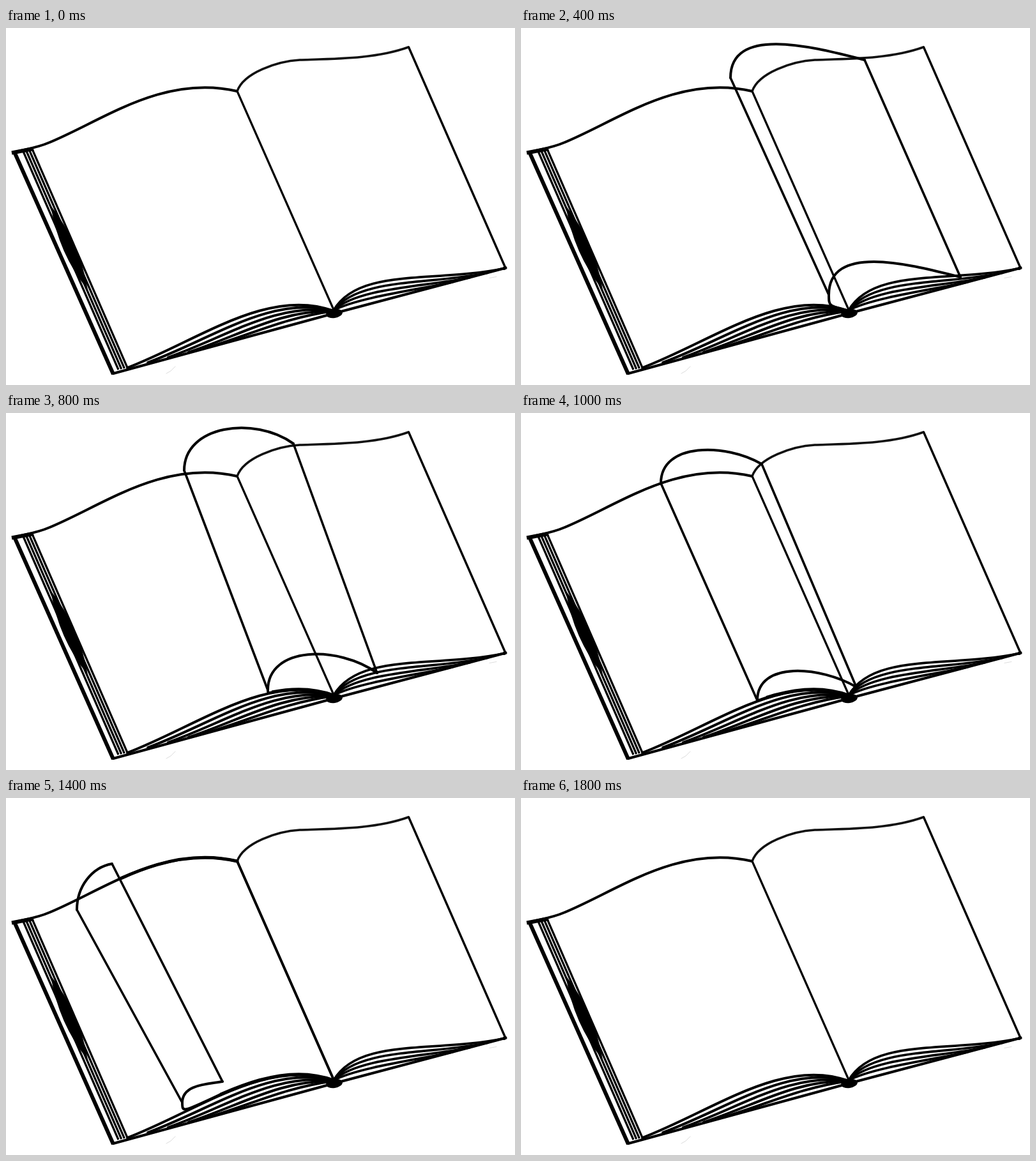
Write an HTML page with a canvas that moves like this. It is 797x559 px and loops after 1.9 s.

```html
<!DOCTYPE html>
<html lang="en">
<head>
<meta charset="utf-8">
<title>Turning page</title>
<style>
html, body { margin: 0; width: 100%; height: 100%; overflow: hidden; background: #fff; }
canvas { display: block; }
</style>
</head>
<body>
<canvas id="stage" width="797" height="559"></canvas>
<script>
const W = 797, H = 559, STEP = 100, LOOP = 1900;
const ctx = document.getElementById('stage').getContext('2d');
const points = s => s.split(' ').map(p => p.split(',').map(Number));

// Paths of the sheet's corners: the fold and the free edge, top and bottom
const keyTimes = [0, 400, 800, 1000, 1200, 1400, 1700];
const foldTop = points('362,98 328,78 279,90 219,110 148,122 111,175 62,176');
const foldBottom = points('513,440 482,418 410,434 370,450 313,449 276,477 220,508');
const freeTop = points('630,30 538,50 450,48 377,80 274,60 166,103 30,166');
const freeBottom = points('782,375 688,390 581,407 525,429 426,406 339,444 177,508');

const leftTop = new Path2D('M11 195C30 190 50 187 66 180C150 146 245 72 362 99');
const rightTop = new Path2D('M362 99C372 70 425 52 460 50C520 48 580 48 630 30');
const spine = [[362, 99], [513, 441]];

// Lower edges of the two covers
const leftEdge = x => 541 - (x - 168) * 0.2725;
const rightEdge = x => 447 - (x - 513) * 0.264;

function stroke(path, width, color = '#000') {
  ctx.lineWidth = width;
  ctx.strokeStyle = color;
  ctx.stroke(path);
}

function line(a, b, width, color) {
  const path = new Path2D();
  path.moveTo(...a);
  path.lineTo(...b);
  stroke(path, width, color);
}

function cubic([a, b, c, d], width, color) {
  const path = new Path2D();
  path.moveTo(...a);
  path.bezierCurveTo(...b, ...c, ...d);
  stroke(path, width, color);
}

function rightOf(x, paint) {
  ctx.save();
  ctx.beginPath();
  ctx.rect(x, 0, W, H);
  ctx.clip();
  paint();
  ctx.restore();
}

// Leaf seen from below; f runs from the top page (0) down to the cover (1)
function leftLeaf(f) {
  const x = 190 + 160 * f, x1 = x + 110 - 44 * f, x2 = 410 + 30 * f;
  return [
    [x, leftEdge(x) - 3 * (1 - f)], [x1, leftEdge(x1) - 15 * (1 - f)],
    [x2, leftEdge(x2) - 70 * (1 - f)], [513, 443]
  ];
}

function rightLeaf(f) {
  const x1 = 552, x2 = 670 - 20 * f, x = 782 - 110 * f;
  return [
    [513, 442], [x1, rightEdge(x1) - 62 * (1 - f)],
    [x2, rightEdge(x2) - 6 * (1 - f)], [x, rightEdge(x)]
  ];
}

// Point of the left top page; x is very nearly linear along the curve
function onLeftPage(x) {
  const u = (x - 190) / 323, v = 1 - u;
  const weights = [v * v * v, 3 * v * v * u, 3 * v * u * u, u * u * u];
  return [x, leftLeaf(0).reduce((y, p, i) => y + p[1] * weights[i], 0)];
}

function drawBook() {
  ctx.lineCap = 'butt';
  line([13, 194], [168, 542], 6);
  line([9, 195.5], [43, 189], 6);
  for (let i = 0; i < 4; i++) line([26 + i * 5.2, 191], [176 + i * 4.7, 535 - i], 3.2);
  ctx.fillStyle = '#000';
  ctx.fill(new Path2D('M70 278Q82 353 128 410Q116 337 70 278'));

  ctx.lineCap = 'round';
  stroke(leftTop, 4);
  stroke(rightTop, 3.6, '#111');
  line([630.5, 30], [782, 375.5], 3.4);
  line(...spine, 3.2);
  for (let i = 0; i < 5; i++) cubic(leftLeaf(i / 5), 4);
  for (let i = 0; i < 4; i++) cubic(rightLeaf(i / 4), 3.6);
  line([168, 541], [513, 447], 4);
  line([513, 447], [781, 376], 4);
  line([780, 376.5], [782, 375.5], 5);
  ctx.beginPath();
  ctx.ellipse(514, 447, 13, 7, -0.15, 0, Math.PI * 2);
  ctx.fill();

  // Faint pencil marks
  stroke(new Path2D('M251 541L258 537L265 530M757 391.5L768 389.5'), 1, '#ddd');
}

function at(keys, t) {
  let i = 0;
  while (i < keyTimes.length - 2 && t >= keyTimes[i + 1]) i++;
  const k = (t - keyTimes[i]) / (keyTimes[i + 1] - keyTimes[i]);
  return keys[i].map((v, j) => v + (keys[i + 1][j] - v) * k);
}

// Edge of the sheet: straight up from the fold, then over to the free corner
function bulge(fold, free, arch) {
  const size = Math.hypot(free[0] - fold[0], free[1] - fold[1]);
  cubic([
    fold, [fold[0], fold[1] - 0.4 * size],
    [free[0] - 0.35 * size, free[1] - 0.25 * arch * size], free
  ], 4);
}

function drawSheet(t) {
  const [a, b, c, d] = [foldTop, foldBottom, freeTop, freeBottom].map(keys => at(keys, t));
  const arch = Math.cos((t - 800) / 330);
  bulge(a, c, arch);
  bulge(b, d, arch);
  line(a, b, 3.6);
  line(c, d, 3.6);

  // Underside rolls onto the left page, and the rest lies flat on it
  const touch = onLeftPage(Math.min(513, b[0] + 6 + 42 * (1 - arch)));
  const under = onLeftPage(b[0]);
  cubic([b, under, under, touch], 4);
  rightOf(touch[0], () => cubic(leftLeaf(0).map(([x, y]) => [x, y - 1]), 5));
  if (t > 1000) {
    rightOf(c[0] + 13, () => stroke(leftTop, 5));
    line(...spine, 4);
  }
}

function draw(now) {
  const t = Math.floor((now % LOOP) / STEP) * STEP;
  ctx.fillStyle = '#fff';
  ctx.fillRect(0, 0, W, H);
  ctx.lineJoin = 'round';
  drawBook();
  if (t > 0 && t < 1800) drawSheet(t);
}

let start;
function tick(now) {
  start ??= now;
  draw(now - start);
  requestAnimationFrame(tick);
}
draw(0);
requestAnimationFrame(tick);
</script>
</body>
</html>
```
